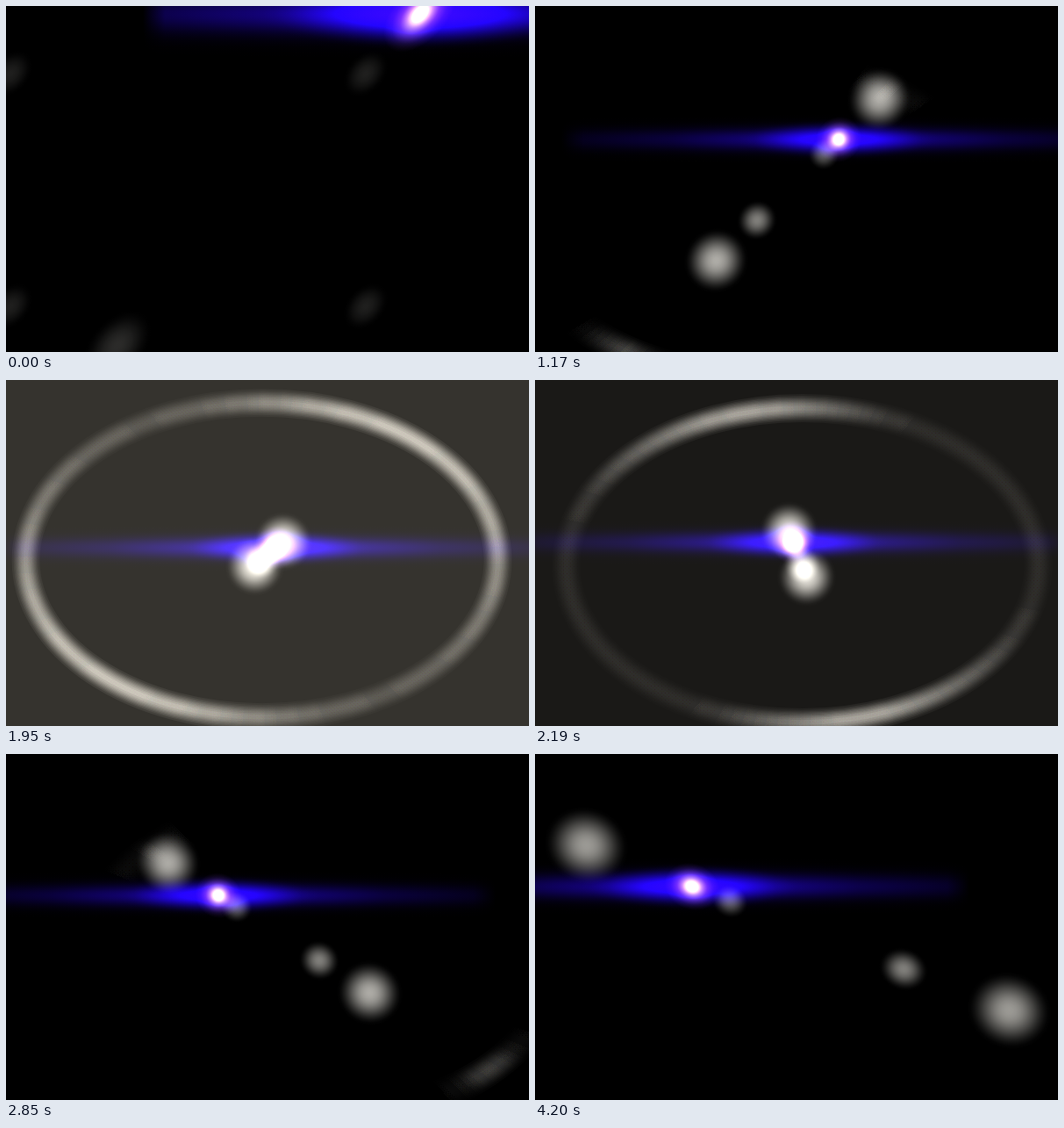
An HTML page with a canvas for the animation above (4.23 s loop, 596x394 px).

```html
<!DOCTYPE html>
<html lang="en">
<head>
<meta charset="utf-8">
<title>Lens flare</title>
<style>
html, body { margin: 0; width: 100%; height: 100%; overflow: hidden; background: #000; }
canvas { display: block; }
</style>
</head>
<body>
<canvas id="stage" width="596" height="394"></canvas>
<script>
const ctx = document.getElementById('stage').getContext('2d');
const W = 596, H = 394, CX = 299.5, CY = 198;
const LOOP = 4230, STEP = 30;

// Light offset from the flare centre: time, x, y
const PATH = [
  [240, 172.5, -189], [720, 102.5, -114], [1170, 46.5, -46], [1950, 8, -7],
  [2190, -5, -13], [2850, -57.5, -37], [3500, -99.5, -44.5], [4200, -120.5, -47]
];

// Reflections on the axis through the centre: k = place on the axis
const bigGlow = d => 0.55 + 0.3 * Math.exp(-d / 80);
const GHOSTS = [
  { k: 2, r: 34, wide: 1.1, long: 1.7, glow: bigGlow },
  { k: -2, r: 34, wide: 1.1, long: 1.7, glow: bigGlow },
  { k: -1, r: 22, wide: 0.4, long: 1.2, glow: d => 0.5 * fade(d) },
  { k: 0.64, r: 18, wide: 0.2, long: 0.7, glow: d => 0.36 * fade(d), tiled: true }
];
const TILE_X = 405, TILE_Y = 265;

const clamp = (v, lo, hi) => Math.min(hi, Math.max(lo, v));
const fade = d => clamp((300 - d) / 130, 0, 1);

// Monotone cubic through the path points
function along(t, axis) {
  const n = PATH.length - 1;
  t = clamp(t, PATH[0][0], PATH[n][0]);
  const slope = i => (PATH[i + 1][axis] - PATH[i][axis]) / (PATH[i + 1][0] - PATH[i][0]);
  const tangent = i => {
    if (i === 0) return slope(0);
    if (i === n) return 0;
    const a = slope(i - 1), b = slope(i);
    return a * b > 0 ? 2 * a * b / (a + b) : 0;
  };
  let i = 0;
  while (i < n - 1 && t > PATH[i + 1][0]) i++;
  const span = PATH[i + 1][0] - PATH[i][0];
  const u = (t - PATH[i][0]) / span, u2 = u * u, u3 = u2 * u;
  return (2 * u3 - 3 * u2 + 1) * PATH[i][axis] + (3 * u2 - 2 * u3) * PATH[i + 1][axis] +
    span * ((u3 - 2 * u2 + u) * tangent(i) + (u3 - u2) * tangent(i + 1));
}

function softDisc(x, y, long, wide, angle, paint) {
  ctx.save();
  ctx.translate(x, y);
  ctx.rotate(angle);
  ctx.scale(long, wide);
  const g = ctx.createRadialGradient(0, 0, 0, 0, 0, 1);
  paint(g);
  ctx.fillStyle = g;
  ctx.fillRect(-1, -1, 2, 2);
  ctx.restore();
}

// Bell-shaped gradient from the middle out
function bell(rgb, alpha) {
  return grad => {
    for (let i = 0; i <= 12; i++) {
      const u = i / 12;
      grad.addColorStop(u, `rgba(${rgb},${alpha * (1 - u * u) ** 2})`);
    }
  };
}

function drawGhost(g, dx, dy, d, q, angle) {
  const x = CX + g.k * dx, y = CY + g.k * dy;
  const paint = bell('255,252,244', g.glow(d));
  const reach = g.tiled ? 1 : 0;
  for (let i = -reach; i <= reach; i++) {
    for (let j = -reach; j <= reach; j++) {
      softDisc(x + i * TILE_X, y + j * TILE_Y,
        g.r * (1 + g.long * q), g.r * (1 + g.wide * q), angle, paint);
    }
  }
}

function drawBeam(x, y, d, q) {
  const half = 316, h = 11 + 9.5 * q;
  const power = clamp(1.35 - 0.7 * d / 256, 0.65, 1.25);
  const stops = [[0, 0.9], [0.12, 0.76], [0.3, 0.5], [0.6, 0.29], [0.92, 0.16], [1, 0]];
  const g = ctx.createLinearGradient(x - half, 0, x + half, 0);
  for (const [u, v] of stops) {
    const color = `rgba(40,4,255,${v ** power})`;
    g.addColorStop((1 - u) / 2, color);
    g.addColorStop((1 + u) / 2, color);
  }
  ctx.fillStyle = g;
  const top = Math.max(0, Math.floor(y - 3 * h));
  const end = Math.min(H, Math.ceil(y + 3 * h));
  for (let row = top; row < end; row++) {
    ctx.globalAlpha = Math.exp(-(((row + 0.5 - y) / h) ** 2));
    ctx.fillRect(x - half, row, 2 * half, 1);
  }
  ctx.globalAlpha = 1;
  softDisc(x, y, 110 + 70 * q, h * 2, 0, bell('30,6,255', 0.4 + 0.35 * q));
}

function drawCore(x, y, q, angle) {
  softDisc(x, y, 25 * (1 + 1.1 * q), 25 * (1 + 0.2 * q), angle, grad => {
    grad.addColorStop(0, '#fff');
    grad.addColorStop(0.22, '#fff');
    grad.addColorStop(0.36, 'rgba(245,205,235,.65)');
    grad.addColorStop(0.55, 'rgba(190,110,225,.36)');
    grad.addColorStop(0.78, 'rgba(140,70,220,.13)');
    grad.addColorStop(1, 'rgba(120,50,210,0)');
  });
}

// Halo: brightest on the light's axis, narrowing as the light moves away
function drawHalo(dx, dy, d, angle) {
  const cx = CX - dx, cy = CY - dy, layers = 10, stops = 90;
  const peak = 175 * Math.exp(-d / 67) / layers;
  const floor = 0.3 * Math.exp(-((Math.max(0, d - 11) / 3) ** 2));
  const power = d * d / 48;
  const front = Math.exp(-Math.max(0, d - 13) / 40);
  const g = ctx.createConicGradient(angle + Math.PI, cx, cy);
  for (let i = 0; i <= stops; i++) {
    const c = Math.cos(i / stops * 2 * Math.PI);
    const lobe = Math.abs(c) ** power * (c < 0 ? front : 1);
    const v = peak * (floor + (1 - floor) * lobe);
    g.addColorStop(i / stops, `rgba(255,249,238,${v / 255})`);
  }
  ctx.strokeStyle = g;
  const reach = 18 + Math.min(4, d * 0.05);
  for (let i = 0; i < layers; i++) {
    ctx.lineWidth = 4 * reach / Math.PI * Math.acos(Math.sqrt((i + 0.5) / layers));
    ctx.beginPath();
    ctx.ellipse(cx, cy, 269, 179, 0, 0, 2 * Math.PI);
    ctx.stroke();
  }
}

function draw(t) {
  const dx = along(t, 1), dy = along(t, 2);
  const d = Math.hypot(dx, dy), q = (d / 256) ** 2;
  const angle = Math.atan2(dy, dx);
  const flash = Math.max(0, 17.1 - d) * 8.2;

  ctx.globalCompositeOperation = 'source-over';
  ctx.fillStyle = `rgb(${flash},${flash * 0.96},${flash * 0.87})`;
  ctx.fillRect(0, 0, W, H);

  ctx.globalCompositeOperation = 'lighter';
  drawHalo(dx, dy, d, angle);
  drawBeam(CX + dx, CY + dy, d, q);
  for (const g of GHOSTS) drawGhost(g, dx, dy, d, q, angle);
  drawCore(CX + dx, CY + dy, q, angle);
}

let start;
function tick(now) {
  if (start === undefined) start = now;
  const t = (now - start) % LOOP;
  draw(Math.floor(t / STEP) * STEP);
  requestAnimationFrame(tick);
}
draw(0);
requestAnimationFrame(tick);
</script>
</body>
</html>
```
